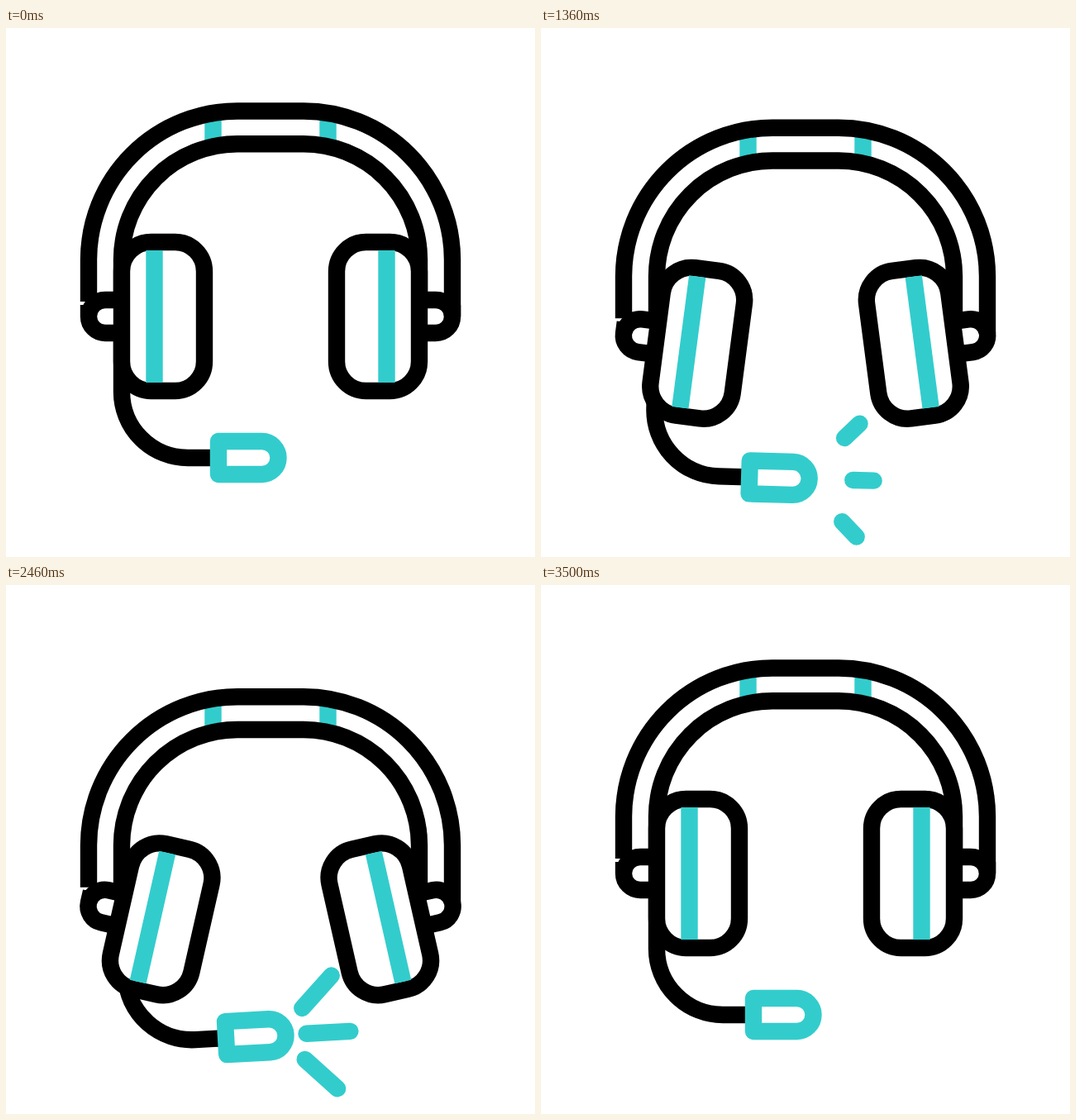
Write an HTML page that moves like this. It is 640 px wide and 640 px high and loops after 3600 ms.

```html
<!DOCTYPE html>
<html lang="en">
<head>
<meta charset="utf-8">
<title>Headset</title>
<style>
  html, body { margin: 0; width: 100%; height: 100%; overflow: hidden; background: #fff; }
  svg { display: block; width: 100vw; height: 100vh; }
  .ink, .teal { fill: none; stroke: #000; stroke-width: 20.4; stroke-linejoin: round; }
  .teal { stroke: #33cccc; }
  .cup { fill: #fff; }
  #rays { stroke-linecap: round; }
</style>
</head>
<body>
<svg viewBox="0 0 640 640">
  <g id="mic">
    <path class="ink" d="M140 360V440A80 80 0 0 0 220 520H255"/>
    <path class="teal" fill-rule="evenodd" style="fill:#fff" d="M257 500H309.5A20 20 0 0 1 309.5 540H257Z"/>
  </g>
  <g id="band">
    <path class="teal" d="M250.5 102V149M389.5 102V149"/>
    <path class="ink" d="M100 331V280A180 180 0 0 1 280 100.5H360A180 180 0 0 1 540 280V349"/>
    <path class="ink" d="M140 331V280A140 140 0 0 1 280 140.3H360A140 140 0 0 1 500 280V331"/>
  </g>
  <g id="left">
    <path class="ink" d="M140 329H120A20 20 0 0 0 120 369H140M100 349V335"/>
    <rect class="ink cup" x="140" y="259" width="100" height="180" rx="35.5"/>
    <path class="teal" d="M179.5 269V429"/>
  </g>
  <g id="right">
    <path class="ink" d="M500 329H520A20 20 0 0 1 520 369H500M540 349V335"/>
    <rect class="ink cup" x="400" y="259" width="100" height="180" rx="35.5"/>
    <path class="teal" d="M460.5 269V429"/>
  </g>
  <g id="rays" class="teal"><path/><path/><path/></g>
</svg>
<script>
const LOOP = 3600;
const PIVOT_Y = 349;

// Each track is a list of [time, value] keys, eased in and out between keys.
const drop  = [[0, 0], [900, 42], [1800, 0], [2700, 42], [3500, 0]];
const tilt  = [[0, 0], [900, 15.5], [1800, 0], [2700, 15.5], [3500, 0]];
const swing = [[0, 0], [900, -5.5], [1800, 8.2], [2700, -5.5], [3500, 0]];

// Ray bursts: the tip shoots out, then the tail catches up with it.
const bursts = [
  { tip: [[760, 0], [1085, 1]], tail: [[1150, 0], [1560, 1]] },
  { tip: [[1560, 0], [1880, 1]], tail: [[2680, 0], [3040, 1]] }
];

const RAY = 53;
const rays = [[354.5, 520, 0], [351, 489, -45], [351, 551, 45]];

const $ = id => document.getElementById(id);
const parts = { mic: $('mic'), band: $('band'), left: $('left'), right: $('right'), rays: $('rays') };
const rayPaths = [...parts.rays.children];

function valueAt(keys, t) {
  if (t <= keys[0][0]) return keys[0][1];
  for (let i = 1; i < keys.length; i++) {
    const [t0, a] = keys[i - 1], [t1, b] = keys[i];
    if (t < t1) {
      const u = (t - t0) / (t1 - t0);
      return a + (b - a) * u * u * (3 - 2 * u);
    }
  }
  return keys[keys.length - 1][1];
}

function pose(el, dy, angle = 0, pivotX = 0) {
  el.setAttribute('transform', `translate(0 ${dy}) rotate(${angle} ${pivotX} ${PIVOT_Y})`);
}

function drawRays(t) {
  const burst = bursts[t < 1560 ? 0 : 1];
  const tail = valueAt(burst.tail, t) * RAY;
  const tip = valueAt(burst.tip, t) * RAY;
  rays.forEach(([x, y, deg], i) => {
    const c = Math.cos(deg * Math.PI / 180), s = Math.sin(deg * Math.PI / 180);
    const at = d => `${x + c * d} ${y + s * d}`;
    rayPaths[i].setAttribute('d', tip - tail > 0.05 ? `M${at(tail)}L${at(tip)}` : '');
  });
}

function draw(t) {
  const dy = valueAt(drop, t), cup = valueAt(tilt, t), arm = valueAt(swing, t);
  pose(parts.band, dy);
  pose(parts.left, dy, cup, 97);
  pose(parts.right, dy, -cup, 543);
  pose(parts.mic, dy, arm, 140);
  pose(parts.rays, dy, arm, 140);
  drawRays(t);
}

const start = performance.now();
function tick() {
  draw((performance.now() - start) % LOOP);
  requestAnimationFrame(tick);
}
tick();
</script>
</body>
</html>
```
